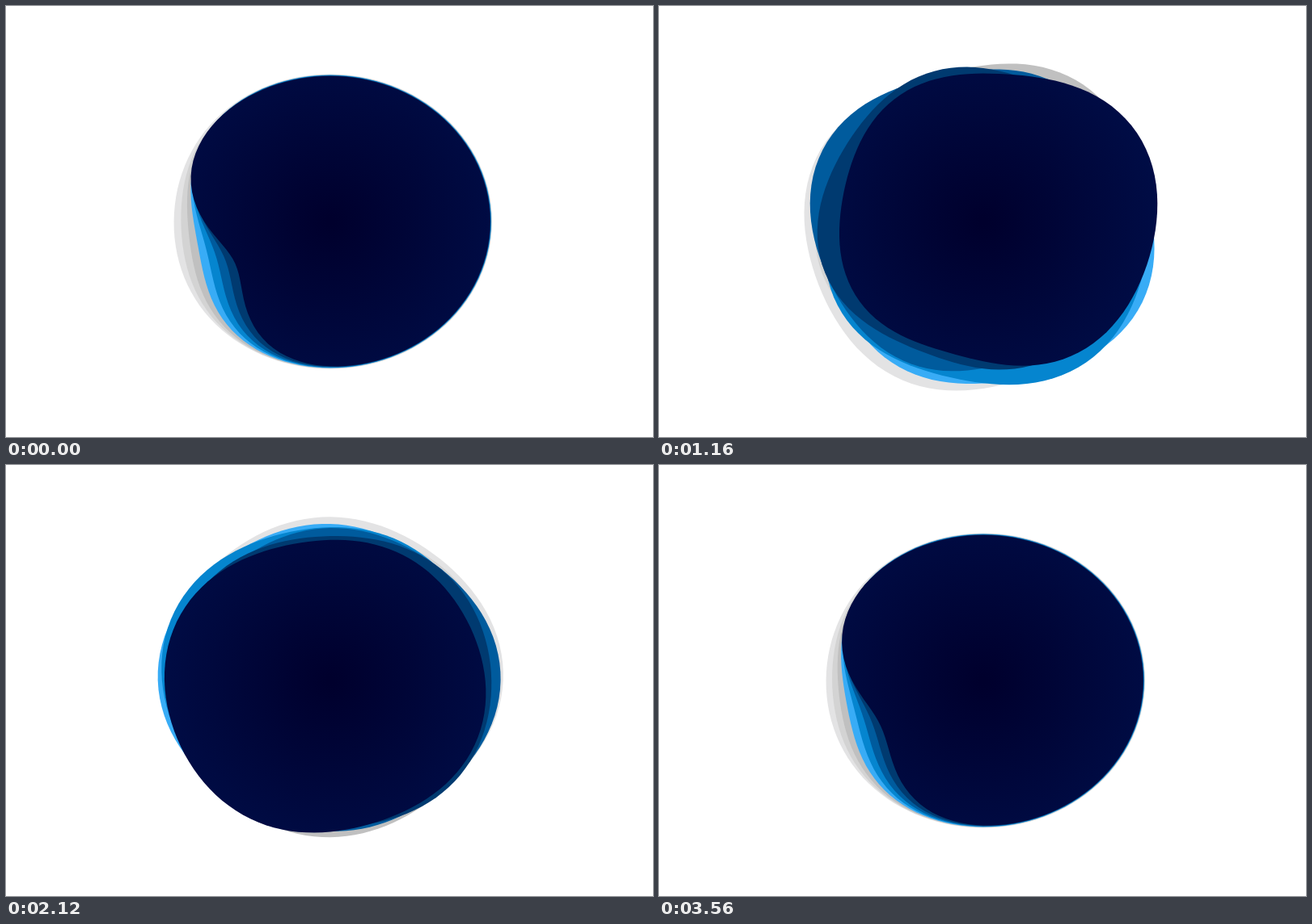
Recreate the animation shown at these times as an HTML page with a canvas. Size 800x534 px, loop 3600 ms.

```html
<!DOCTYPE html>
<html lang="en">
<head>
<meta charset="utf-8">
<title>Layered blob</title>
<style>
html, body { margin: 0; width: 100%; height: 100%; overflow: hidden; background: #fff; }
canvas { display: block; width: 100%; height: 100%; }
</style>
</head>
<body>
<canvas id="stage" width="800" height="534"></canvas>
<script>
const ctx = document.getElementById('stage').getContext('2d');
const CX = 401, CY = 267, RX = 200, RY = 182.5;
const LOOP = 3600, SPOKES = 120, RAD = Math.PI / 180;

const navy = ctx.createRadialGradient(CX, CY, 5, CX, CY, 215);
navy.addColorStop(0, '#00002d');
navy.addColorStop(1, '#000c45');

// Back to front; angles in degrees, clockwise from the right
const layers = [
  { color: '#e3e3e4', swell: 14, drift: 15, heading: 70, lobe: 60 },
  { color: '#d3d3d3', swell: 5, drift: 8, heading: 20, lobe: 20 },
  { color: '#c0c0c0', swell: 5, drift: 11, heading: 245, lobe: 65 },
  { color: '#38acf6', swell: 5, drift: 18, heading: 10, lobe: 65 },
  { color: '#0585cf', swell: 3, drift: 20, heading: 15, lobe: 0 },
  { color: '#005b9d', swell: 4, drift: 11, heading: 140, lobe: 60 },
  { color: '#003a70', swell: 2, drift: 4, heading: 200, lobe: 15 },
  { color: navy, swell: 0, drift: 19, heading: 288, lobe: 0 }
];

const ramp = (t, from, to) => Math.min(1, Math.max(0, (t - from) / (to - from)));
const smooth = (t, from, to) => {
  const u = ramp(t, from, to);
  return u * u * (3 - 2 * u);
};
const wave = deg => Math.cos(deg * RAD);

// Bell curve around an angle, 23 degrees wide
function bell(deg) {
  const d = ((deg + 540) % 360 + 360) % 360 - 180;
  return Math.exp(-d * d / (2 * 23 * 23));
}

function ellipse(deg) {
  return 1 / Math.hypot(Math.cos(deg * RAD) / RX, Math.sin(deg * RAD) / RY);
}

function draw(t) {
  // Burst: every layer drifts and ripples while the whole stack turns
  const burst = smooth(t, 0, 500) * (1 - smooth(t, 1940, 2440));
  const turn = 0.157 * (t - 800);
  // Calm: the edge peels inwards, deeper and further round towards the front
  const dents = [
    { angle: 158, depth: 66 * (1 - smooth(t, 0, 450) + ramp(t, 3340, LOOP)) },
    { angle: 144 + 0.1875 * (t - 2440), depth: 55 * smooth(t, 2180, 2440) * (1 - smooth(t, 3080, 3440)) }
  ];

  ctx.fillStyle = '#fff';
  ctx.fillRect(0, 0, 800, 534);
  layers.forEach((layer, i) => {
    const front = i / (layers.length - 1);
    ctx.beginPath();
    for (let s = 0; s < SPOKES; s++) {
      const deg = s * 360 / SPOKES, own = deg - turn;
      let r = ellipse(deg) - 2.3 * front * (1 - burst);
      r += burst * layer.swell;
      r += burst * burst * (layer.drift * wave(own - layer.heading) + 6 * wave(4 * (own - layer.lobe)));
      for (const d of dents) {
        r -= d.depth * (0.1 + 0.9 * front) * bell(deg - d.angle - 24 * (1 - front));
      }
      ctx.lineTo(CX + r * wave(deg), CY + r * Math.sin(deg * RAD));
    }
    ctx.closePath();
    ctx.fillStyle = layer.color;
    ctx.fill();
  });
}

// The picture is held for 80 ms, with a few longer rests
const LONG = [0, 5, 9, 17, 19, 28, 32];
const starts = [0];
for (let k = 0; k < 40; k++) {
  starts.push(starts[k] + (k === 39 ? 160 : LONG.includes(k) ? 120 : 80));
}

const begin = performance.now();
let shown = -1;
function tick() {
  const t = (performance.now() - begin) % LOOP;
  const k = starts.filter(s => s <= t).length - 1;
  if (k !== shown) draw(starts[shown = k]);
  requestAnimationFrame(tick);
}
tick();
</script>
</body>
</html>
```
